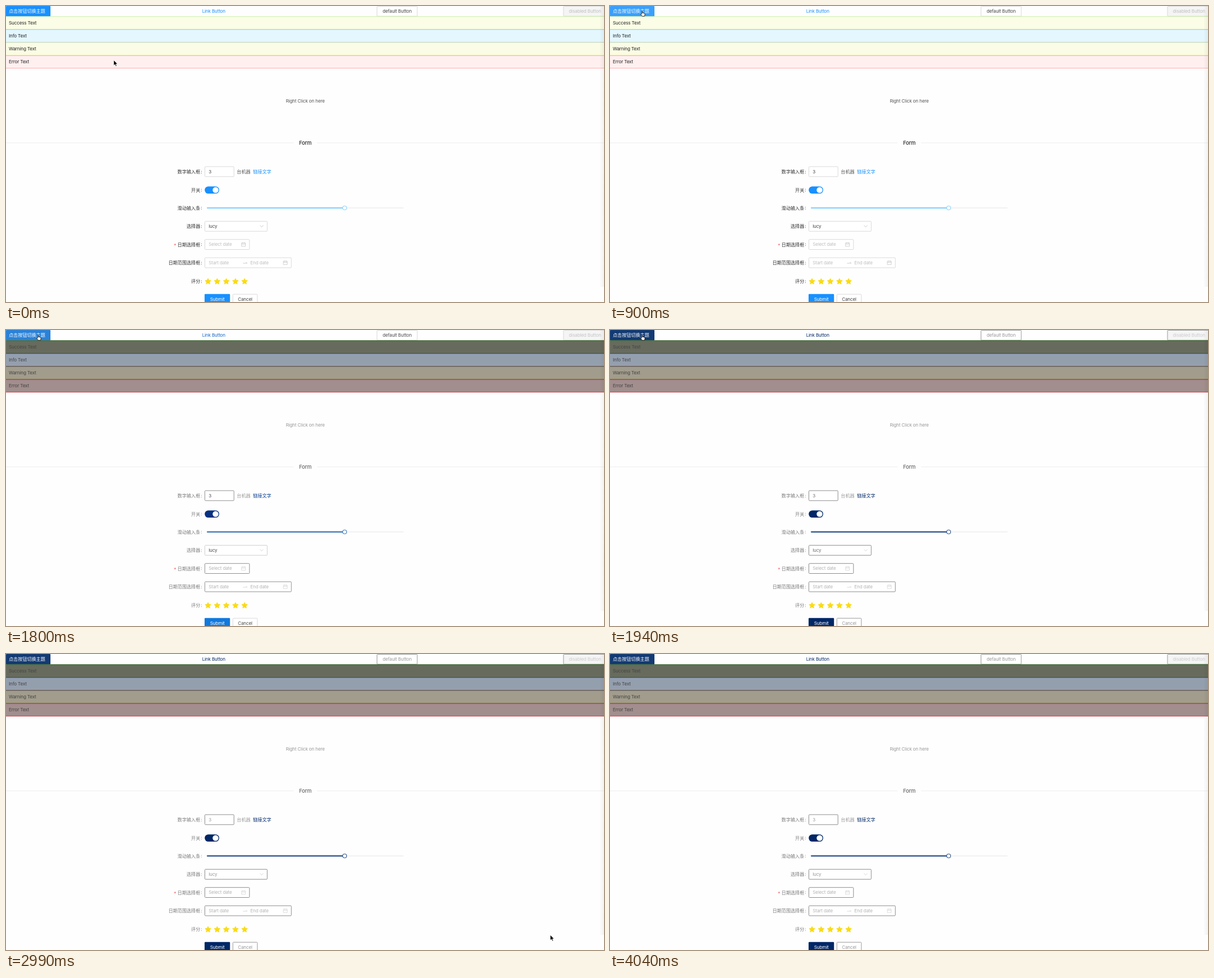
These frames come from a looping animation (1063 by 527 pixels, 4330 ms). An HTML page:

```html
<!DOCTYPE html>
<html lang="zh-CN">
<head>
<meta charset="utf-8">
<title>Theme switch</title>
<style>
  html, body { margin: 0; width: 100%; height: 100%; overflow: hidden; background: #fefefe; }
  svg { display: block; width: 1063px; height: 527px; }
  text {
    font: 8.1px Inter, "Noto Sans CJK SC", "Noto Sans CJK", sans-serif;
    letter-spacing: -.15px;
    white-space: pre;
  }
  text.cjk { font-family: "Noto Sans CJK SC", "Noto Sans CJK", sans-serif; letter-spacing: 0; }
  text.title { font-size: 9.3px; font-weight: 500; letter-spacing: -.2px; }
</style>
</head>
<body>
<svg id="stage" viewBox="0 0 1063 527" lang="zh-CN"></svg>
<script>
const LOOP = 4330;
const stage = document.getElementById('stage');

// Colour of each role: light theme, first moment of the switch, dark theme
const theme = {
  link:     ['#1890ff', '#1268c8', '#002766'],
  anchor:   ['#1890ff', '#003a8c', '#002766'],
  toggle:   ['#1890ff', '#063280', '#002766'],
  submit:   ['#1890ff', '#1278dc', '#002766'],
  track:    ['#91d5ff', '#4b82bd', '#3b5f92'],
  label:    ['#303030', '#7c7c7c', '#7c7c7c'],
  body:     ['#555555', '#999999', '#999999'],
  title:    ['#262626', '#666666', '#666666'],
  button:   ['#444444', '#4c4c4c', '#999999'],
  edge:     ['#d9d9d9', '#d9d9d9', '#999999'],
  field:    ['#d9d9d9', '#909090', '#8c8c8c'],
  select:   ['#d9d9d9', '#cfcfcf', '#8c8c8c'],
  icon:     ['#bfbfbf', '#d0d0d0', '#d0d0d0'],
  hint:     ['#bfbfbf', '#b4b4b4', '#b4b4b4'],
  off:      ['#bfbfbf', '#c4c4c4', '#cccccc'],
  alert:    ['#222222', '#444444', '#444444'],
  success:  ['#fbfde6', '#676b5d', '#676b5d'],
  info:     ['#e4f7ff', '#949fae', '#949fae'],
  warning:  ['#fbfce5', '#a19c8c', '#a19c8c'],
  error:    ['#fff0ef', '#a18e8d', '#a18e8d'],
  successB: ['#b7eb8f', '#135200', '#135200'],
  infoB:    ['#78c4ee', '#003a8c', '#003a8c'],
  warningB: ['#ffe58f', '#874d00', '#874d00'],
  errorB:   ['#ff8f8a', '#b81522', '#b81522']
};

// [start time, value]; each value holds until the next
const themeSteps = [[0, 0], [1800, 1], [1940, 2]];
const switchSteps = [[0, '#1890ff'], [900, '#3a9ffb'], [1800, '#2a82d8'], [1940, '#123a73']];
const valueSteps = [[0, '#444444'], [1800, '#4a4a4a'], [1940, '#707070'], [2090, '#8c8c8c'], [2240, '#999999']];
const cursorSteps = [
  [0, [191.5, 96.5]], [150, [164.5, 87.5]], [300, [121.5, 67.5]], [450, [84.5, 34.5]],
  [600, [68.7, 18.5]], [750, [54, 8.5, 'hand']], [2240, [98.5, 22.5]],
  [2390, [494.8, 173.3]], [2540, [783, 313]], [2690, [894.5, 443.5]], [2840, [929, 476.5]],
  [2990, [967.5, 500.3]], [3140, [996.5, 516.5]], [3290, [1011, 523.5]], [3440, null]
];

const ink = name => name[0] === '#' || name === 'none' ? name : `var(--${name})`;

function text(str, x, mid, fill, { anchor = 'start', cls = '' } = {}) {
  const cjk = /[\u4e00-\u9fff]/.test(str);
  const base = mid + (cjk ? 3.1 : cls === 'title' ? 3.3 : 2.9);
  return `<text class="${cjk ? 'cjk' : cls}" x="${x}" y="${base}" text-anchor="${anchor}" fill="${ink(fill)}">${str}</text>`;
}
const centred = (str, x, mid, fill, cls) => text(str, x, mid, fill, { anchor: 'middle', cls });

function box(x, y, w, h, fill, stroke = 'none', r = 1.2, line = 1) {
  return `<rect x="${x}" y="${y}" width="${w}" height="${h}" rx="${r}" fill="${ink(fill)}" stroke="${ink(stroke)}" stroke-width="${line}"/>`;
}
const path = (d, stroke, line = .7) =>
  `<path d="${d}" fill="none" stroke="${ink(stroke)}" stroke-width="${line}"/>`;
const label = (str, mid) =>
  text(str, 345.3, mid, 'label', { anchor: 'end' }) + text(':', 346.2, mid, 'label');
const calendar = (x, y) =>
  path(`M${x} ${y + 1}h7v6h-7zM${x} ${y + 3.2}h7M${x + 2} ${y}v2M${x + 5} ${y}v2`, 'icon');

function star(cx, cy) {
  const points = Array.from({ length: 10 }, (_, i) => {
    const r = i % 2 ? 2.75 : 5.5, a = (i / 5 - .5) * Math.PI;
    return `${(cx + r * Math.cos(a)).toFixed(2)},${(cy + r * Math.sin(a)).toFixed(2)}`;
  });
  return `<polygon points="${points.join(' ')}" fill="#fadb14" stroke="#fadb14" stroke-width=".9" stroke-linejoin="round"/>`;
}

function alerts() {
  return ['success', 'info', 'warning', 'error'].map((kind, i) => {
    const y = 18.5 + i * 23.15;
    const name = kind[0].toUpperCase() + kind.slice(1);
    return box(-2, y + .3, 1067, 22.55, kind, kind + 'B', 0, .7) +
      text(name + ' Text', 5, y + 11.6, 'alert');
  }).join('');
}

function header() {
  return box(0, 0, 79, 18.5, 'switch') + text('点击按钮切换主题', 5, 9.2, '#ffffff') +
    centred('Link Button', 369.3, 9.3, 'link') +
    box(659.5, .5, 71.5, 17.7, '#ffffff', 'edge') + centred('default Button', 695.3, 9.3, 'button') +
    box(991, .5, 77, 17.7, '#f5f5f5', 'edge') + centred('disabled Button', 1029.2, 9.3, 'off');
}

function form() {
  return [
    centred('Right Click on here', 532, 169.2, 'body'),
    path('M0 243.7H511M553 243.7H1063', '#ececec', .9),
    centred('Form', 532, 243.8, 'title', 'title'),

    label('数字输入框', 295),
    box(353.5, 286, 51.7, 17.8, '#ffffff', 'field'),
    text('3', 360.3, 295, 'value'),
    text('台机器', 410.3, 295, 'body'),
    text('链接文字', 439.2, 295, 'anchor'),

    label('开关', 327.5),
    box(353.2, 321.2, 25.8, 12.8, 'toggle', 'none', 6.4),
    '<circle cx="372.5" cy="327.6" r="5.2" fill="#fff"/>',

    label('滑动输入条', 359.5),
    box(357, 358.3, 350, 2.4, '#f3f3f3'),
    box(357, 358.3, 245, 2.4, 'track'),
    `<circle cx="602" cy="359.5" r="3.5" fill="#fff" stroke="${ink('track')}" stroke-width="1.2"/>`,

    label('选择器', 392),
    box(353.5, 383.3, 110.8, 17.8, '#ffffff', 'select'),
    text('lucy', 360.3, 392, 'value'),
    path('M451.7 390.4l2.9 3.3 2.9-3.3', 'icon', .8),

    text('*', 298.4, 426, '#ff4d4f'),
    label('日期选择框', 424.5),
    box(353.5, 415.7, 79.3, 17.8, '#ffffff', 'field'),
    text('Select date', 360.3, 424.5, 'hint'),
    calendar(418.7, 420.8),

    label('日期范围选择框', 457),
    box(353.5, 448.2, 153.7, 17.8, '#ffffff', 'field'),
    text('Start date', 360.3, 457, 'hint'),
    path('M421.3 458h7.4l-2.2-2.3', 'icon', .8),
    text('End date', 434.3, 457, 'hint'),
    calendar(493, 453.3),

    label('评分', 489.7),
    ...[0, 1, 2, 3, 4].map(i => star(359.1 + i * 16.25, 490.6)),

    box(353, 512.7, 45.2, 18.6, 'submit'),
    centred('Submit', 375.6, 521.7, '#ffffff'),
    box(403.3, 513.2, 43.5, 17.8, '#ffffff', 'edge'),
    centred('Cancel', 425, 521.7, 'button')
  ].join('');
}

const shade = `
  <defs><linearGradient id="shade">
    <stop offset="0" stop-color="#000" stop-opacity=".012"/>
    <stop offset="1" stop-color="#000" stop-opacity=".05"/>
  </linearGradient></defs>
  <rect x="1056" width="7" height="500" fill="url(#shade)"/>`;

const cursors = `
  <g id="arrow"><path d="M0 0V9.3L2.2 7.4 3.7 10.7 5.2 10 3.8 6.8H6.7Z"
    fill="#000" stroke="#fff" stroke-width=".6"/></g>
  <g id="hand"><path d="M2.3 5.6V1.2Q2.3.3 3 .3T3.8 1.2V4Q5 3.4 5.3 4.3 6.5 3.9 6.7 4.8 8 4.6 8 5.8V7.3Q7.8 8.4 7.1 9.8H3.3Q2.6 8.7.5 6.5.1 5.6 1 5.3 1.6 5.1 2.3 6Z"
    fill="#fff" stroke="#000" stroke-width=".8" stroke-linejoin="round"/></g>`;

stage.innerHTML = header() + alerts() + form() + shade + cursors;
const pointers = ['arrow', 'hand'].map(id => document.getElementById(id));

const at = (steps, t) => steps.findLast(step => step[0] <= t)[1];
const paint = (name, colour) => stage.style.setProperty('--' + name, colour);

function draw(t) {
  const mode = at(themeSteps, t);
  for (const name in theme) paint(name, theme[name][mode]);
  paint('switch', at(switchSteps, t));
  paint('value', at(valueSteps, t));

  const spot = at(cursorSteps, t);
  for (const p of pointers) {
    const shown = spot && p.id === (spot[2] || 'arrow');
    p.setAttribute('visibility', shown ? 'visible' : 'hidden');
    if (shown) p.setAttribute('transform', `translate(${spot[0]} ${spot[1]})`);
  }
}

const start = performance.now();
function tick() {
  draw((performance.now() - start) % LOOP);
  requestAnimationFrame(tick);
}
tick();
</script>
</body>
</html>
```
